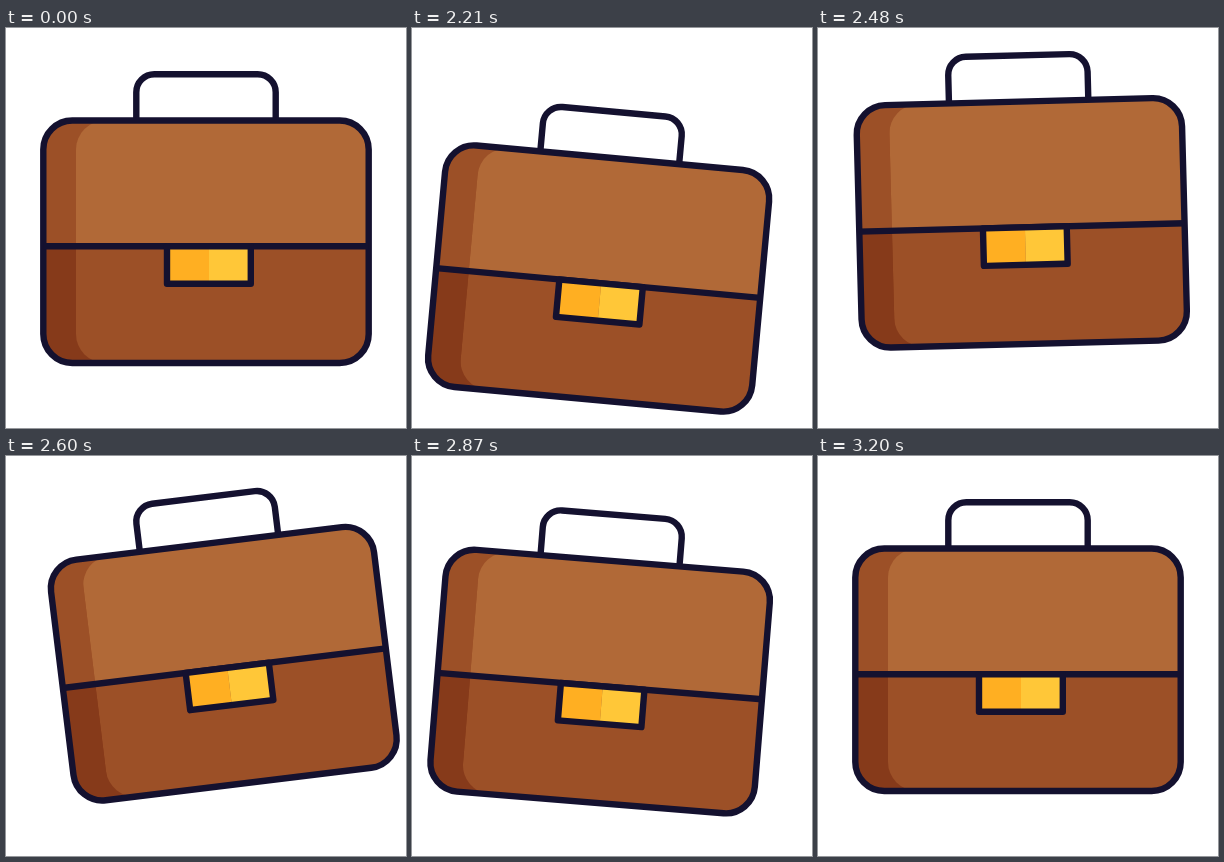
An HTML page with a canvas that plays this animation: 400x400 px, repeating every 3230 ms.

```html
<!DOCTYPE html>
<html lang="en">
<head>
<meta charset="utf-8">
<title>Swinging briefcase</title>
<style>
  html, body { margin: 0; width: 100%; height: 100%; overflow: hidden; background: #fff; }
  canvas { display: block; width: 400px; height: 400px; }
</style>
</head>
<body>
<canvas id="stage" width="400" height="400"></canvas>
<script>
const ctx = document.getElementById('stage').getContext('2d');

const LOOP = 3230, REST = 2000, STEP = 30;
const PIVOT = { x: 200, y: 67.5 };
const INK = '#14112f';

// Keys are [step, value]: swing in degrees, bounce in pixels.
const SWING = [[0, 0], [10.4, 7], [20.2, -7], [30, 5], [40, 0]];
const BOUNCE = [[0, 0], [5.25, 42], [15.6, -19], [25.7, 15.7], [36.7, 0]];

function valueAt(keys, step) {
  const next = keys.findIndex(([at]) => at > step);
  if (next < 0) return keys[keys.length - 1][1];
  const [startAt, from] = keys[next - 1];
  const [endAt, to] = keys[next];
  const u = (step - startAt) / (endAt - startAt);
  return from + (to - from) * u * u * (3 - 2 * u);
}

function fillRect(color, x, y, w, h) {
  ctx.fillStyle = color;
  ctx.fillRect(x, y, w, h);
}

function roundRect(x, y, w, h, r) {
  ctx.beginPath();
  ctx.roundRect(x, y, w, h, r);
}

function drawHandle() {
  ctx.beginPath();
  ctx.moveTo(130.3, 93);
  ctx.arcTo(130.3, 46.3, 200, 46.3, 18);
  ctx.arcTo(269.7, 46.3, 269.7, 93, 18);
  ctx.lineTo(269.7, 93);
  ctx.stroke();
}

function drawBody() {
  ctx.save();
  roundRect(37.3, 92.5, 325.4, 242.5, 29);
  ctx.clip();
  fillRect('#9c5027', 34, 89, 332, 129);
  fillRect('#863a1a', 34, 218, 332, 120);
  // Lit front face, leaving a shaded strip on the left
  roundRect(70, 92.5, 292.7, 242.5, 29);
  ctx.clip();
  fillRect('#b16937', 70, 89, 296, 129);
  fillRect('#9c5027', 70, 218, 296, 120);
  ctx.restore();

  roundRect(37.3, 92.5, 325.4, 242.5, 29);
  ctx.stroke();
  ctx.beginPath();
  ctx.moveTo(37.3, 218.3);
  ctx.lineTo(362.7, 218.3);
  ctx.stroke();
}

function drawLock() {
  fillRect('#ffaf22', 161, 219, 42, 37);
  fillRect('#ffc738', 203, 219, 42, 37);
  ctx.strokeRect(161, 218.3, 83.8, 37.5);
}

function draw(time) {
  const step = Math.max(0, Math.floor((time % LOOP - REST) / STEP));
  fillRect('#fff', 0, 0, 400, 400);
  ctx.save();
  ctx.translate(PIVOT.x, PIVOT.y + valueAt(BOUNCE, step));
  ctx.rotate(valueAt(SWING, step) * Math.PI / 180);
  ctx.translate(-PIVOT.x, -PIVOT.y);
  ctx.strokeStyle = INK;
  ctx.lineWidth = 6.4;
  ctx.lineJoin = 'round';
  drawHandle();
  drawBody();
  drawLock();
  ctx.restore();
}

const start = performance.now();
function tick() {
  draw(performance.now() - start);
  requestAnimationFrame(tick);
}
tick();
</script>
</body>
</html>
```
